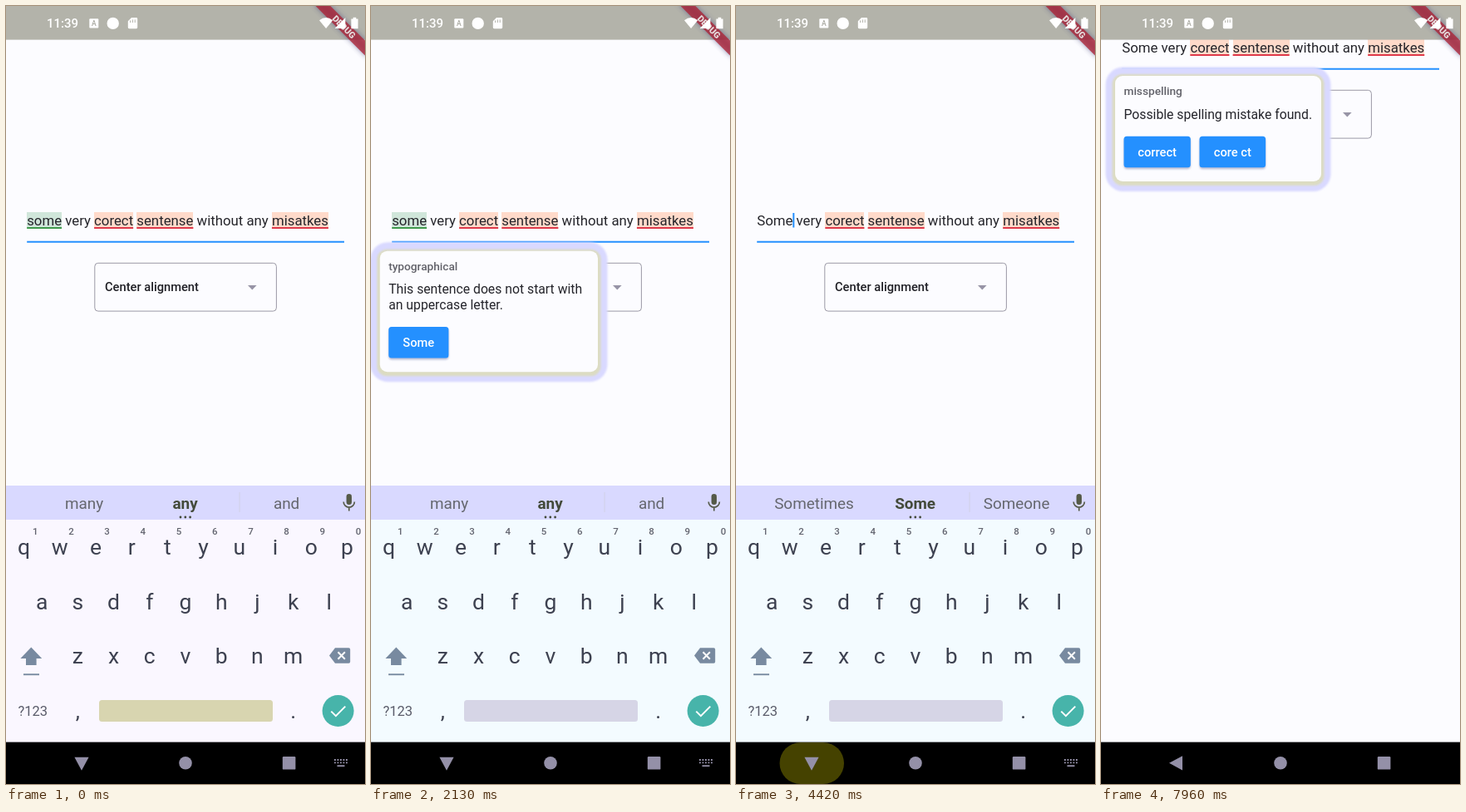
Recreate the animation shown at these times as an HTML page. Size 432 by 936 pixels, loop 8000 ms.

```html
<!DOCTYPE html>
<html lang="en">
<head>
<meta charset="utf-8">
<title>Spell check field</title>
<style>
html, body { margin: 0; width: 100%; height: 100%; overflow: hidden; background: #fcfcff; }
#stage { position: absolute; left: 0; top: 0; width: 432px; height: 936px; overflow: hidden; background: #fcfcff; }
#stage, svg text { font-family: Roboto, sans-serif; }
#field { position: absolute; left: 25.2px; top: 249px; white-space: pre; font-size: 16.8px; line-height: 19.7px; color: #25252b; }
#field span { text-decoration: underline 1.5px #e0394a; text-underline-offset: 1.5px; background: #ffdaca; }
#field #first { text-decoration-color: #3f9a4c; background: #d0e6da; }
#field #first.ok { text-decoration: none; background: none; }
svg { position: absolute; left: 0; top: 0; display: block; }
.mid { text-anchor: middle; }
.med { font-weight: 500; }
</style>
</head>
<body>
<div id="stage">
<div id="field"><span id="first">some</span> very <span>corect</span> <span>sentense</span> without any <span>misatkes</span></div>
<svg width="432" height="936" viewBox="0 0 432 936">
  <defs>
    <filter id="soft" x="-20%" y="-20%" width="140%" height="140%"><feGaussianBlur stdDeviation="1.2"/></filter>
    <filter id="wide" x="-20%" y="-80%" width="140%" height="260%"><feGaussianBlur stdDeviation="3"/></filter>
  </defs>

  <g id="form">
    <path d="M25.2 283.7H407" stroke="#2490ff" stroke-width="2"/>
    <rect x="106.8" y="309.3" width="218.6" height="57.8" rx="4" fill="none" stroke="#9b99a6"/>
    <text id="choice" class="med" x="119" y="342.6" font-size="14.7" fill="#202026"></text>
    <path d="M291 336h10.6l-5.3 5.4z" fill="#9794a6"/>
    <rect id="caret" y="249" width="2" height="17.5" fill="#2490ff"/>
  </g>

  <g id="pops"></g>

  <g id="board">
    <rect y="617" width="432" height="270" id="panel"/>
    <rect y="577" width="432" height="41" fill="#d9d9ff"/>
    <path d="M281 585v24" stroke="#d0d0e6"/>
    <g id="hints" class="mid" font-size="18.9" fill="#65676e">
      <text x="94" y="605"></text>
      <text x="215.6" y="605" font-weight="700" fill="#434a3a"></text>
      <text x="337.6" y="605"></text>
    </g>
    <g fill="#434a3a"><circle cx="210" cy="615" r="1.4"/><circle cx="215.8" cy="615" r="1.4"/><circle cx="221.6" cy="615" r="1.4"/></g>
    <rect x="409.6" y="587" width="6.4" height="13" rx="3.2" fill="#555a48"/>
    <path d="M406.2 596.5a6.6 6.6 0 0 0 13.2 0M412.8 603.5v4" fill="none" stroke="#555a48" stroke-width="1.7"/>
    <g id="keys" class="mid" fill="#3d4150"></g>
    <text class="mid" x="32.3" y="853.8" font-size="16.5" fill="#5a5c6a">?123</text>
    <rect id="space" x="112" y="835" width="209" height="26" rx="3.5"/>
    <g fill="#788aa0">
      <path d="M30.3 771.5L43.2 785H36.6V793H24V785H17.4z"/>
      <rect x="21" y="803.3" width="19" height="1.9"/>
      <path d="M396 772.3H412.4a1.8 1.8 0 0 1 1.8 1.8V789a1.8 1.8 0 0 1-1.8 1.8H396L389 781.6z"/>
    </g>
    <path d="M399.5 777.3l8.4 8.4M407.9 777.3l-8.4 8.4" stroke="#fff" stroke-width="2"/>
    <circle cx="399.6" cy="848" r="19" fill="#47b4aa"/>
    <path d="M391.3 848.6l5.6 5.5L408.3 842.6" fill="none" stroke="#fff" stroke-width="2"/>
  </g>

  <rect y="885.6" width="432" height="51" fill="#000"/>
  <rect id="ripple" x="52.5" y="886" width="77.5" height="50" rx="25" fill="#454200"/>
  <g id="nav">
    <path id="back" d="M-9 0L7 -8.6V8.6z"/>
    <circle cx="216" cy="910.8" r="7.8"/>
    <rect x="332.8" y="903" width="15.6" height="15.6" rx="1.2"/>
  </g>
  <g id="switch" fill="none" stroke="#9490a8" stroke-width="1.8">
    <path d="M395 907h16M395 910.4h16" stroke-dasharray="1.9 1.6"/>
    <path d="M398.5 914.2h9"/>
  </g>

  <rect width="432" height="40.6" fill="#b3b3aa"/>
  <g transform="translate(432 0) rotate(45)">
    <rect x="-44" y="29.4" width="88" height="12.6" fill="#3c3c78" opacity=".55" filter="url(#wide)"/>
    <rect x="-44" y="29.4" width="88" height="12.6" fill="#ad2335" opacity=".78"/>
    <text class="mid" y="39.5" font-size="10.7" font-weight="900" fill="#e6dcdc">DEBUG</text>
  </g>
  <g fill="#fff">
    <text class="med" x="49" y="26.3" font-size="15">11:39</text>
    <rect x="100.3" y="15.2" width="11" height="11.2" rx="1"/>
    <circle cx="128.7" cy="20.9" r="7.2"/>
    <path d="M151 14h5.8a1.4 1.4 0 0 1 1.4 1.4v10.4a1.4 1.4 0 0 1-1.4 1.4h-8.6a1.4 1.4 0 0 1-1.4-1.4V18.2z"/>
    <path d="M377 17.2q8.1-6.6 16.2 0L385.1 27z"/>
    <path d="M408.4 14V27H395.6z"/>
    <path d="M415.4 15.4h2.3V13.8h3.6v1.6h2.3V27.2h-8.2z"/>
  </g>
  <text class="mid med" x="105.8" y="23.9" font-size="8.5" fill="#a5a59d">A</text>
  <path d="M149.6 17.4v2.6M152.4 16.4v3.6M155.2 16.4v3.6" stroke="#b3b3aa" stroke-width="1"/>
</svg>
</div>
<script>
const $ = id => document.getElementById(id);
const LOOP = 8000;
const FIX = 3000, TOP = 6400;      // first word corrected, form moved to the top
const CLOSE = 4680, CLOSED = 4960; // keyboard slides away

const clamp = v => Math.max(0, Math.min(1, v));
const ramp = (t, a, b) => clamp((t - a) / (b - a));
const ease = v => v * v * (3 - 2 * v);

function label(x, y, size, text, extra = '') {
  return `<text x="${x}" y="${y}" font-size="${size}" ${extra}>${text}</text>`;
}

function buildKeys() {
  let out = '';
  [['qwertyuiop', 21.6, 660], ['asdfghjkl', 43.2, 726], ['zxcvbnm', 86.4, 791.3]].forEach(([row, x0, y]) => {
    [...row].forEach((c, i) => out += label(x0 + 43.2 * i, y, 26.5, c));
  });
  for (let i = 0; i < 10; i++)
    out += label(35.2 + 43.2 * i, 636.2, 11.5, (i + 1) % 10, 'class="med" fill="#62646f"');
  out += label(86.4, 857, 26, ',') + label(345.6, 857, 26, '.');
  $('keys').innerHTML = out;
}

function button(x, y, w, text) {
  return `<rect x="${x}" y="${y + 2}" width="${w}" height="37.5" rx="4" fill="#b9bbd2" filter="url(#soft)"/>
    <rect x="${x}" y="${y}" width="${w}" height="37.5" rx="3.5" fill="#2490ff"/>` +
    label(x + w / 2, y + 24, 14.7, text, 'class="mid med" fill="#fff"');
}

function popup(x, y, w, h, title, lines, buttons) {
  const box = (l, t, r, b, rx, attrs) =>
    `<rect x="${x - l}" y="${y - t}" width="${w + l + r}" height="${h + t + b}" rx="${rx}" ${attrs}/>`;
  let out = box(11.5, 10.5, 11.5, 12, 21, 'fill="#d9d9ff" filter="url(#soft)"') +
    box(3.5, 2, 3.5, 5, 12, 'fill="#dcdcc2" filter="url(#soft)"') +
    box(0, 0, 0, 0, 9, 'fill="#fcfcff"') +
    label(x + 10.5, y + 23, 13.65, title, 'class="med" fill="#62626a"');
  lines.forEach((s, i) => out += label(x + 10.5, y + 51.5 + 18.6 * i, 15.75, s, 'fill="#25252b"'));
  let bx = x + 10.5;
  buttons.forEach(([s, bw]) => {
    out += button(bx, y + h - 54.3, bw, s);
    bx += bw + 10.7;
  });
  const g = document.createElementNS('http://www.w3.org/2000/svg', 'g');
  g.innerHTML = out;
  $('pops').append(g);
  return g;
}

buildKeys();
const casePop = popup(10.7, 294.7, 262.3, 145.5, 'typographical',
  ['This sentence does not start with', 'an uppercase letter.'], [['Some', 72.2]]);
const spellPop = popup(17, 84, 248, 127, 'misspelling',
  ['Possible spelling mistake found.'], [['correct', 80.3], ['core ct', 79.6]]);

function setText(el, s) {
  if (el.textContent !== s) el.textContent = s;
}

function show(el, alpha) {
  el.setAttribute('opacity', alpha);
  el.setAttribute('display', alpha > 0 ? 'inline' : 'none');
}

function draw(t) {
  const fixed = t >= FIX, atTop = t >= TOP, early = t < 110;
  const shut = ease(ramp(t, CLOSE, CLOSED));
  const dy = atTop ? -208 : 155 * shut;

  setText($('first'), fixed ? 'Some' : 'some');
  $('first').className = fixed ? 'ok' : '';
  $('field').style.transform = `translateY(${dy}px)`;
  $('form').setAttribute('transform', `translate(0 ${dy})`);
  setText($('choice'), atTop ? 'Top alignment' : 'Center alignment');

  const pop1 = ramp(t, 1920, 2070) * (1 - ramp(t, FIX, FIX + 120));
  const pop2 = ramp(t, 7450, 7600);
  show(casePop, pop1);
  show(spellPop, pop2);

  const phase = t % 1000;
  const lit = t >= 1040 && phase >= 340 && phase < 840 && !pop1 && !pop2;
  show($('caret'), lit ? 1 : 0);
  $('caret').setAttribute('x', fixed ? 68.3 : 316.4);

  $('panel').setAttribute('fill', early ? '#faf7ff' : '#f3fbff');
  $('space').setAttribute('fill', early ? '#d8d5b0' : '#d6d5e6');
  const words = fixed ? ['Sometimes', 'Some', 'Someone'] : ['many', 'any', 'and'];
  words.forEach((s, i) => setText($('hints').children[i], s));
  $('board').setAttribute('transform', `translate(0 ${310 * shut})`);
  show($('board'), shut < 1 ? 1 : 0);

  show($('ripple'), ramp(t, 4130, 4230) * (1 - ramp(t, 4460, 4760)));
  $('back').setAttribute('transform', `translate(91 910.8) rotate(${-90 * (1 - shut)})`);
  const bright = shut > 0.5 && t < 7500;
  $('nav').setAttribute('fill', bright ? '#fff' : '#9490a8');
  show($('switch'), 1 - shut);
}

const start = performance.now();
function tick() {
  draw((performance.now() - start) % LOOP);
  requestAnimationFrame(tick);
}
tick();
</script>
</body>
</html>
```
